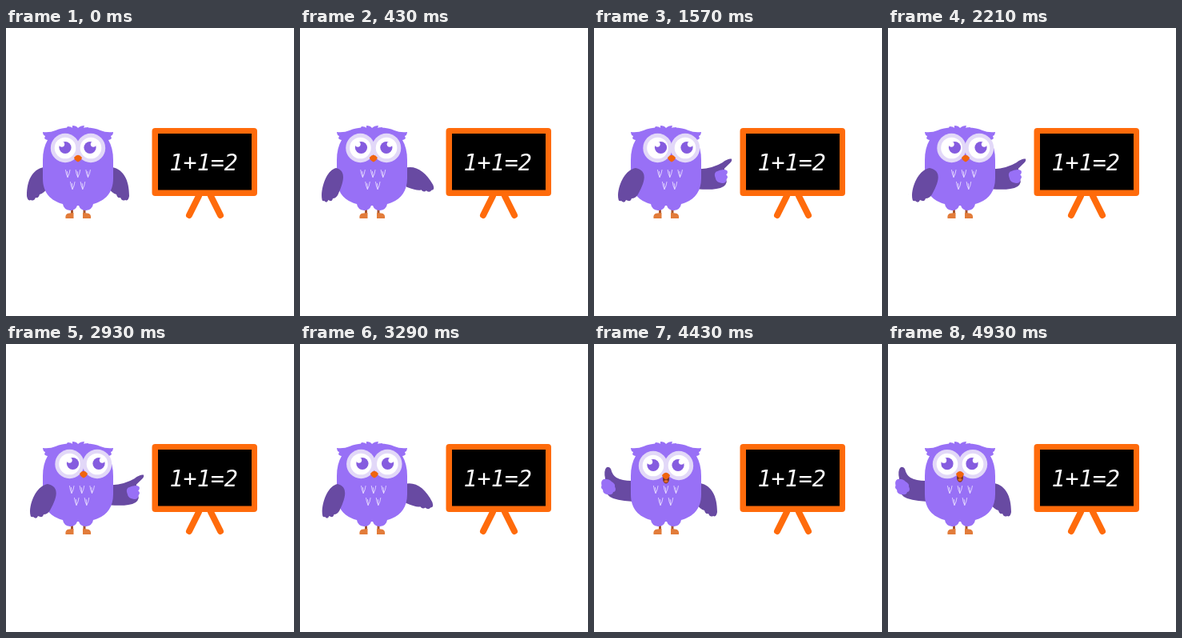
Write an HTML page that moves like this. It is 360 px wide and 360 px high and loops after 5 s.

```html
<!DOCTYPE html>
<html lang="en">
<head>
<meta charset="utf-8">
<title>Owl teacher</title>
<style>
  html, body { margin: 0; width: 100%; height: 100%; overflow: hidden; background: #fff; }
  svg { display: block; width: 100vw; height: 100vh; }
  text { font: italic 28.4px "DejaVu Sans Mono", monospace; fill: #fff; }
  .body { fill: #9870f6; }
  .wing { fill: #684aa2; }
  .orange { fill: #ff6b0b; }
  .marks { fill: none; stroke: #eee5ff; stroke-width: .8; stroke-linecap: round; }
</style>
</head>
<body>
<svg viewBox="0 0 360 360">
  <defs>
    <path id="feathers" class="wing" d="M124 174H133C147 177 154 190 154 210Q153 217 149 215Q145 217 143 212Q139 213 138 208Q134 208 124 196Z"/>
    <path id="mark" d="M-3 -5Q-2.5 0 -.4 4Q-.4 0 -1 -3M-.4 4Q2 0 2.500 -5"/>
    <path id="half" class="body" d="M91 125Q108 123 118 128Q125 131 134 130Q134 134 131 135L132 138Q130 140 128 140Q134 150 134 165V188C134 206 124 216 109 220Q108 227 100 228Q93 228 91 222H89V125Z"/>
    <g id="eye">
      <circle r="18.200" fill="#e2d8f8"/>
      <circle r="13.300" fill="#fff"/>
    </g>
    <g id="pupil">
      <circle r="7.600" fill="#855cdf"/>
      <circle cx="-4.200" cy="-4.200" r="3.400" fill="#fff"/>
    </g>
    <g id="foot">
      <path d="M96.500 226h3v7h-3z" fill="#a8562f"/>
      <path d="M96 231V238H106Q107 232 101.500 231.500Z" fill="#e27c3a"/>
    </g>
  </defs>

  <g id="board">
    <path d="M241 210L229 234M256 210L268 234" stroke="#ff6b0b" stroke-width="8" stroke-linecap="round"/>
    <rect class="orange" x="182.500" y="125" width="131.500" height="85" rx="4"/>
    <rect x="190" y="132" width="117" height="70.500"/>
    <text x="204.500" y="178">1+1=2</text>
  </g>

  <g id="owl">
    <use id="rightWing" href="#feathers"/>
    <g id="point">
      <path class="wing" d="M126 176H134Q150 178 163 173Q171 169 175 170.500Q176 173 172 175.500L164 181V198Q161 205 150 204Q141 204 126 200Z"/>
      <path class="body" d="M153 183Q163 180 167 184Q168 187 165 189Q168 192 164 195Q163 200 157 198Q151 196 151 190Q150 185 153 183Z"/>
    </g>
    <g id="leftWing"><use href="#feathers" transform="matrix(-1 0 0 1 180 0)"/></g>
    <g id="thumb">
      <path class="wing" d="M56 171H47Q35 171 28 167Q23 164 21 156Q18 152 15 155Q12 159 14 168L12 178Q14 189 24 193Q36 197 56 197Z"/>
      <path class="body" d="M12 169Q18 168 22 172Q27 175 26 178L27 181Q27 185 24 185Q23 189 18 188Q11 188 11 182Q8 180 9.500 177Q8 171 12 169Z"/>
    </g>
    <use href="#foot"/>
    <use href="#foot" transform="matrix(-1 0 0 1 180.500 0)"/>
    <use href="#half"/>
    <use href="#half" transform="matrix(-1 0 0 1 180 0)"/>
    <path class="body" d="M74 128L77 123Q81 123 83 125V122Q88 122 90 125Q93 122 98 122L97 125L103 124L102 128Z"/>
    <g id="chest" class="marks"></g>
    <g id="head">
      <use id="eyeL" href="#eye"/>
      <use id="eyeR" href="#eye"/>
      <use id="pupilL" href="#pupil"/>
      <use id="pupilR" href="#pupil"/>
      <g id="beak">
        <ellipse id="mouth" cx="90" rx="4" fill="#7d3522"/>
        <ellipse id="tongue" cx="90" rx="2.600" fill="#e06a2a"/>
        <path fill="#f0640f" d="M85 162Q90 155.500 95 162Q94 165.500 90 167.500Q86 165.500 85 162Z"/>
      </g>
    </g>
    <path id="frontWing" class="wing" d="M22 0C10 2 1 18 0 34Q0 43 4 41Q8 45 10 40Q16 43 17 38Q22 38 25 33C30 23 41 4 22 0Z"/>
  </g>
</svg>
<script>
const LOOP = 5000, STEPS = 70;
const $ = id => document.getElementById(id);

// eased 0..1 between steps a and b
function ease(s, a, b) {
  const k = Math.min(1, Math.max(0, (s - a) / (b - a)));
  return k * k * (3 - 2 * k);
}
// repeated 0..1..0 swings between steps a and b
const swing = (s, a, b, period) =>
  s > a && s < b ? Math.sin(Math.PI * (s - a) / period) ** 2 : 0;

const set = (id, value) => $(id).setAttribute("transform", value);
const move = (id, x, y) => set(id, `translate(${x} ${y})`);
const show = (id, on) => $(id).setAttribute("visibility", on ? "visible" : "hidden");

// chest: a row of three marks, then a row of two
for (let row = 0; row < 2; row++) {
  for (let i = 0; i < 3 - row; i++) {
    const mark = document.createElementNS("http://www.w3.org/2000/svg", "use");
    mark.setAttribute("href", "#mark");
    mark.setAttribute("x", 77.5 + 12.7 * i + 6 * row);
    mark.setAttribute("y", 182.5 + 15 * row);
    $("chest").append(mark);
  }
}

function draw(s) {
  const turn = ease(s, 2, 14) - ease(s, 41, 50);
  const right = 85 * (ease(s, 2, 12) - ease(s, 41, 49)) - 8 * swing(s, 22, 40, 9);
  const left = 90 * ease(s, 50, 55);
  const talk = swing(s, 56, STEPS, 3.8);
  const nod = 2 * swing(s, 56, STEPS, 12);

  const pointing = right > 48, thumbUp = left > 46;
  show("rightWing", !pointing);
  show("point", pointing);
  set("rightWing", `rotate(${-right} 134 180)`);
  set("point", `rotate(${75 - right} 134 185)`);

  show("leftWing", !thumbUp && turn === 0);
  show("thumb", thumbUp);
  show("frontWing", turn > 0);
  set("leftWing", `rotate(${left} 46 180)`);
  set("thumb", `rotate(${left - 90} 47 185)`);
  set("frontWing", `translate(${26 + 4 * turn} 175) scale(${.64 + .36 * Math.sqrt(turn)} 1)`);

  const xl = 74 + 5.5 * turn, xr = 106 + 8 * turn;
  move("head", 0, nod);
  move("eyeL", xl, 150);
  move("eyeR", xr, 150);
  move("pupilL", xl + 4 * turn, 149.5);
  set("pupilR", `translate(${xr - 1 + 3 * turn} 149.5) scale(-1 1)`);
  move("beak", 7 * turn, 0);
  move("chest", 5 * turn, 0);

  $("mouth").setAttribute("cy", 163 + 4 * talk);
  $("mouth").setAttribute("ry", 2 + 4 * talk);
  $("tongue").setAttribute("cy", 164 + 6 * talk);
  $("tongue").setAttribute("ry", 1.8 * talk);
}

function tick() {
  const t = performance.now() % LOOP;
  // the small lead absorbs rounding of step times
  draw(Math.floor((t + 5) / LOOP * STEPS) % STEPS);
  requestAnimationFrame(tick);
}
tick();
</script>
</body>
</html>
```
